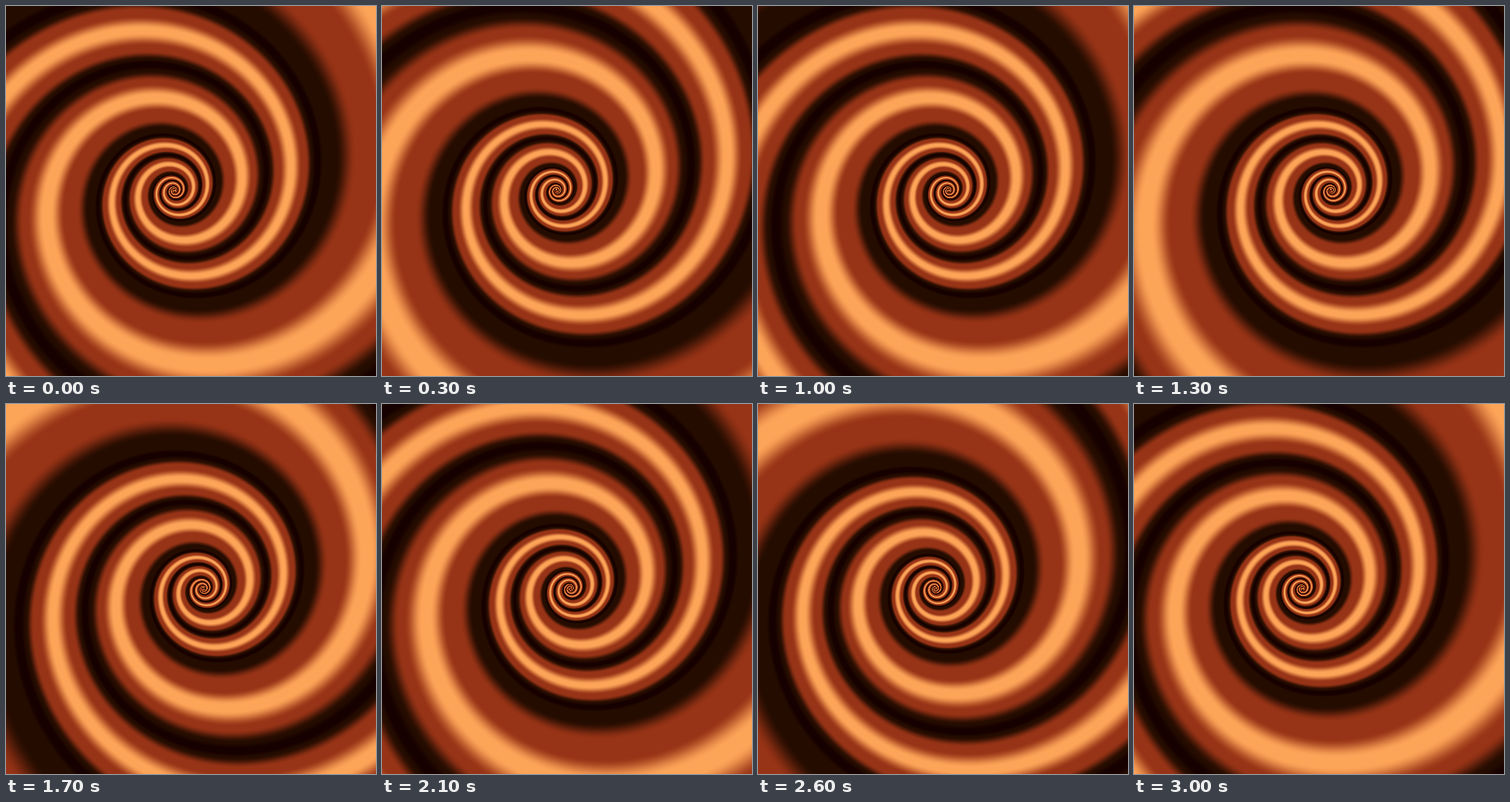
An HTML page with a canvas that plays this animation: 496x496 px, repeating every 3.1 s.

```html
<!DOCTYPE html>
<html lang="en">
<head>
<meta charset="utf-8">
<title>Spiral</title>
<style>
html, body { margin: 0; width: 100%; height: 100%; overflow: hidden; background: #180000; }
canvas { display: block; width: 496px; height: 496px; }
</style>
</head>
<body>
<canvas id="stage" width="496" height="496"></canvas>
<script>
const SIZE = 496, STEP = 100, STEPS = 31, SWING = 45, LEVELS = 4096;
const TAU = Math.PI * 2;
const LEFT = 225, MID_Y = 247;

const INK = {
  light: [252, 164, 88],
  rust: [151, 51, 22],
  dark: [36, 12, 0],
  black: [22, 0, 0]
};

// Colour across one turn of the spiral phase, in radians
const BANDS = [
  [-0.03, 'light'], [0.11, 'light'], [0.48, 'rust'], [0.64, 'rust'],
  [0.87, 'dark'], [1.01, 'black'], [1.11, 'black'], [1.25, 'dark'],
  [1.66, 'dark'], [2.26, 'rust'], [2.86, 'rust'],
  [3.46, 'light'], [3.74, 'light'], [4.32, 'rust'], [4.46, 'rust'],
  [4.87, 'dark'], [5.09, 'black'], [5.19, 'black'], [5.34, 'dark'],
  [5.64, 'rust'], [5.82, 'rust'], [TAU - 0.03, 'light']
];

function colorAt(phase) {
  if (phase > TAU - 0.03) phase -= TAU;
  let i = 1;
  while (i < BANDS.length - 1 && BANDS[i][0] < phase) i++;
  const [p0, n0] = BANDS[i - 1], [p1, n1] = BANDS[i];
  const t = Math.min(1, Math.max(0, (phase - p0) / (p1 - p0)));
  const s = t * t * (3 - 2 * t);
  const [r, g, b] = INK[n0].map((c, k) => Math.round(c + (INK[n1][k] - c) * s));
  return (255 << 24 | b << 16 | g << 8 | r) >>> 0;
}

const palette = Uint32Array.from({ length: LEVELS }, (_, i) => colorAt(i / LEVELS * TAU));

// Phase field, wide enough for the sideways swing of the centre
const WIDE = SIZE + SWING;
const field = new Uint16Array(WIDE * SIZE);
for (let y = 0; y < SIZE; y++) {
  for (let x = 0; x < WIDE; x++) {
    const dx = x - LEFT - SWING, dy = y - MID_Y;
    const phase = 5 * Math.log(Math.hypot(dx, dy) || 1) + Math.atan2(dy, dx);
    field[y * WIDE + x] = Math.floor(phase / TAU * LEVELS) & (LEVELS - 1);
  }
}

const ctx = document.getElementById('stage').getContext('2d');
const image = ctx.createImageData(SIZE, SIZE);
const pixels = new Uint32Array(image.data.buffer);

function draw(step) {
  const shift = SWING - 3 * Math.min(step, 30 - step);
  const turn = LEVELS - Math.round(step % 10 / 10 * LEVELS);
  for (let y = 0, i = 0; y < SIZE; y++) {
    let j = y * WIDE + shift;
    for (let x = 0; x < SIZE; x++) {
      pixels[i++] = palette[(field[j++] + turn) & (LEVELS - 1)];
    }
  }
  ctx.putImageData(image, 0, 0);
}

let shown = 0;
draw(0);
const start = performance.now();

function tick() {
  const step = Math.floor((performance.now() - start) / STEP) % STEPS;
  if (step !== shown) draw(shown = step);
  requestAnimationFrame(tick);
}
requestAnimationFrame(tick);
</script>
</body>
</html>
```
